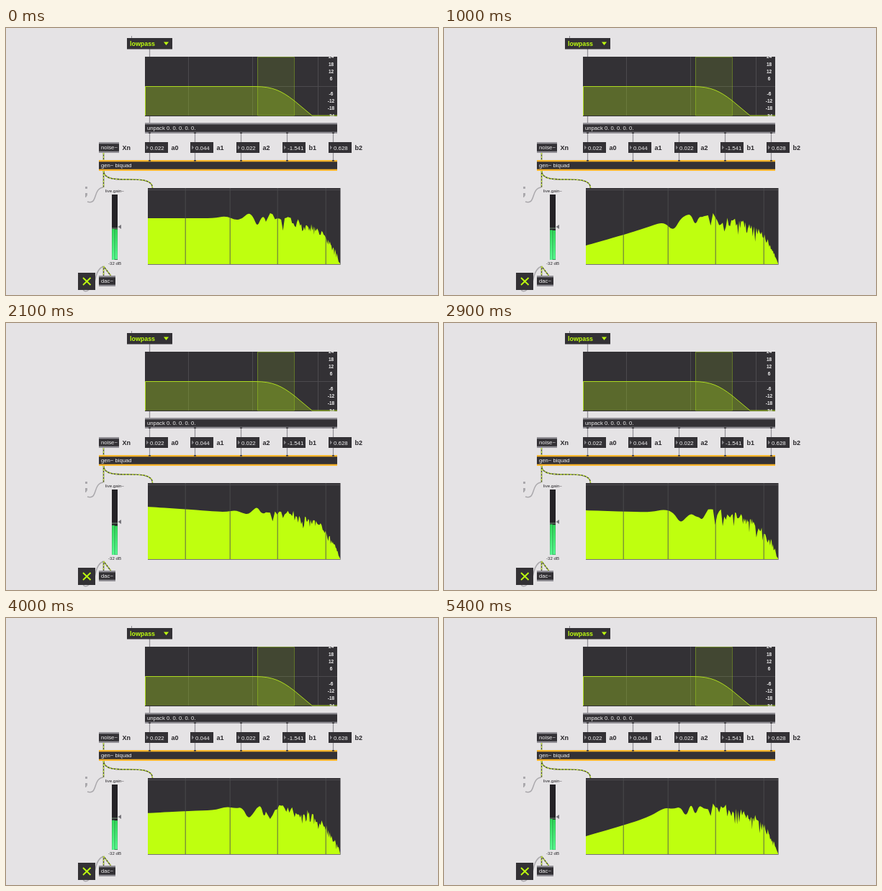
An HTML page with a canvas that plays this animation: 600x372 px, repeating every 5.5 s.

```html
<!DOCTYPE html>
<html lang="en">
<head>
<meta charset="utf-8">
<title>Biquad patch</title>
<style>
  html, body { margin: 0; width: 100%; height: 100%; overflow: hidden; background: #e5e3e5; }
  canvas { display: block; }
</style>
</head>
<body>
<canvas id="stage" width="600" height="372"></canvas>
<script>
const ctx = document.getElementById('stage').getContext('2d');
const LOOP = 5500, STEP = 100;
const DARK = '#333135', LIME = '#bfff0f', GREY = '#929096', INK = '#29272b', WHITE = '#f1f0f1';
const FONT = '"Liberation Sans", Arial, sans-serif';

// Height of the lowest band over time: [ms, y].
const bassKeys = [[0, 265], [1000, 303], [2100, 256], [2900, 261], [3500, 277], [4500, 261], [5400, 304]];

function seeded(seed) {
  let s = (seed + 17) * 2654435761 >>> 0;
  return () => {
    s = s + 0x6d2b79f5 >>> 0;
    let v = Math.imul(s ^ s >>> 15, s | 1);
    v ^= v + Math.imul(v ^ v >>> 7, v | 61);
    return ((v ^ v >>> 14) >>> 0) / 4294967296;
  };
}

function rect(x, y, w, h, color) {
  ctx.fillStyle = color;
  ctx.fillRect(x, y, w, h);
}

function text(str, x, y, size, color = WHITE, weight = 400, align = 'left') {
  ctx.font = `${weight} ${size}px ${FONT}`;
  ctx.textAlign = align;
  ctx.fillStyle = color;
  ctx.fillText(str, x, y);
}

function stroke(path, color, width = 1, dash = []) {
  ctx.strokeStyle = color;
  ctx.lineWidth = width;
  ctx.setLineDash(dash);
  ctx.stroke(new Path2D(path));
  ctx.setLineDash([]);
}

function shape(path, color) {
  ctx.fillStyle = color;
  ctx.fill(new Path2D(path));
}

function signalCord(path) {
  stroke(path, '#45472f', 1.5);
  stroke(path, '#c3e63a', 1.3, [2.5, 2]);
}

function objectBox(label, x, y, w, rail) {
  rect(x, y, w, 15, rail);
  rect(x, y + 2.3, w, 10.4, DARK);
  text(label, x + 3, y + 10.3, 7.7);
}

function drawMenu() {
  stroke('M174.5 11V14', GREY);
  rect(168, 14, 63, 15.5, DARK);
  text('lowpass', 172, 25, 8.9, LIME, 700);
  shape('M219 19.5H226L222.5 24Z', LIME);
}

function drawFilter() {
  const curve = 'M193.5 122V81.5H346C371 81.5 383 88 400 101L425 122';
  rect(193, 40, 267, 83, DARK);
  for (const x of [253, 342, 433]) rect(x, 40, 1, 82, '#4c4a4e');
  rect(193, 81, 267, 1, '#4c4a4e');
  shape(curve + 'Z', 'rgba(170,225,25,.32)');
  rect(349, 40, 51, 82, 'rgba(170,225,25,.12)');
  stroke('M349.5 40.5H400.5V122H349.5Z', 'rgba(170,225,25,.38)');
  stroke(curve + 'H460', '#aedb20');
  ctx.save();
  ctx.beginPath();
  ctx.rect(193, 40, 267, 83);
  ctx.clip();
  for (let db = 24; db >= -24; db -= 6) {
    if (db) text(db, 451.5, 83.5 - db * 1.71, 6.5, WHITE, 700, 'center');
  }
  ctx.restore();
}

function drawCoefficients() {
  const values = ['0.022', '0.044', '0.022', '-1.541', '0.628'];
  const names = ['a0', 'a1', 'a2', 'b1', 'b2'];
  values.forEach((value, i) => {
    const x = 193 + Math.floor(i * 63.75);
    stroke(`M${x + 6.5} 147V159M${x + 6.5} 174V184`, GREY, 1.2);
    rect(x, 159, 32, 15, DARK);
    shape(`M${x + 2} 163.5L${x + 5} 166.5L${x + 2} 169.5Z`, '#858388');
    text(value, x + 7, 169.5, 7.9);
    text(names[i], x + 36.5, 169.8, 9, INK, 700);
  });
}

function drawInlets() {
  for (let i = 0; i < 5; i++) {
    const x = 198 + Math.floor(i * 63.75);
    rect(x, 145.5, 3, 1.5, DARK);
    rect(x, 184, 3, 1.5, DARK);
  }
}

function drawPatch() {
  rect(0, 0, 600, 372, '#e5e3e5');
  stroke('M199.5 29V40M199.5 122V132', GREY, 1.3);
  drawMenu();
  drawFilter();
  objectBox('unpack 0. 0. 0. 0. 0.', 193, 132, 267, GREY);
  drawCoefficients();
  signalCord('M135.5 174V184');
  objectBox('noise~', 129, 159, 28, GREY);
  text('Xn', 161.5, 169.8, 9, INK, 700);
  objectBox('gen~ biquad', 129, 184, 331, '#fdb62b');
  drawInlets();

  stroke('M113 242C128 247 120 224 135 222', '#aaa8ac', 1.5);
  shape('M110 221h3v3h-3zM110 230h3v3l-2 3h-1z', '#aaa8ac');
  signalCord('M135.5 199V222');
  signalCord('M135.5 199C135.5 223 203.5 199 203.5 223');
  stroke('M107 364C110 372 122 362 125 346C127 338 131 334 135 332', '#aaa8ac', 1.4);
  signalCord('M135.5 332V345');
  signalCord('M135.5 332L145.5 345');
  objectBox('dac~', 129, 345, 23, GREY);
  rect(100, 341, 24, 24, DARK);
  stroke('M107 348L117.5 358M117.5 348L107 358', LIME, 1.8);
}

function drawMeter(rand) {
  const top = 279.5 + rand() * 2.5;
  text('live.gain~', 138, 229.3, 6.1, INK);
  rect(147, 232, 8, 91, '#242226');
  const glow = ctx.createLinearGradient(0, 279, 0, 323);
  glow.addColorStop(0, '#30dc58');
  glow.addColorStop(1, '#58ff92');
  rect(147.2, top, 3.6, 323 - top, glow);
  rect(151.2, top + rand(), 3.6, 322 - top, glow);
  rect(147, 278.5, 8, 1, '#77957c');
  shape('M155.5 277L160 274V280Z', '#77757b');
  text('-32 dB', 142, 330.3, 6.1, INK);
}

function bassAt(time, rand) {
  const last = bassKeys.length - 2;
  const i = Math.min(last, bassKeys.findLastIndex(([t]) => t <= time));
  const [t0, y0] = bassKeys[i], [t1, y1] = bassKeys[i + 1];
  const k = Math.min(1, (time - t0) / (t1 - t0));
  return y0 + (y1 - y0) * k + Math.sin(Math.PI * k) * (rand() - 0.5) * 24;
}

// Noise bins on a logarithmic axis: smooth and wide at the left, dense at the right.
function spectrumPath(time, rand) {
  const bass = bassAt(time, rand);
  const path = new Path2D();
  path.moveTo(197, 329);
  path.lineTo(197, bass);
  let x = 197, y = bass;
  for (let bin = 1; ; bin += Math.ceil(bin / 50)) {
    const nextX = 257.5 + 44 * Math.log(bin);
    if (nextX > 463) break;
    const u = Math.max(0, (nextX - 372) / 92);
    const mean = 265 + 19 * u + 44 * u ** 5;
    const spread = Math.min(1, (bin - 1) / 3) * (5.5 - 3 * u);
    const noise = -spread * (Math.log(-Math.log(1 - rand() * 0.999)) + 0.577);
    const tilt = (bass - 265) * 0.55 ** bin;
    const nextY = Math.min(328, mean + tilt + Math.max(-9, Math.min(15, noise)));
    if (bin < 12) path.quadraticCurveTo(x, y, (x + nextX) / 2, (y + nextY) / 2);
    else path.lineTo(nextX, nextY);
    x = nextX;
    y = nextY;
  }
  path.lineTo(464, 328);
  path.lineTo(464, 329);
  path.closePath();
  return path;
}

function drawSpectrum(time, rand) {
  rect(197, 223, 267.5, 106.5, DARK);
  rect(197, 225, 267, 1, '#504e53');
  ctx.fillStyle = LIME;
  ctx.fill(spectrumPath(time, rand));
  for (const x of [249, 311, 377, 444]) rect(x - 0.3, 223, 1, 106, 'rgba(78,78,80,.85)');
  stroke('M197 329.5H464.5', '#6a686d', 0.7);
}

function render(now) {
  const step = Math.floor((now % LOOP) / STEP);
  const rand = seeded(step);
  drawPatch();
  drawMeter(rand);
  drawSpectrum(step * STEP, rand);
}

let start;
function tick(now) {
  start ??= now;
  render(Math.max(0, now - start));
  requestAnimationFrame(tick);
}
render(0);
requestAnimationFrame(tick);
</script>
</body>
</html>
```
